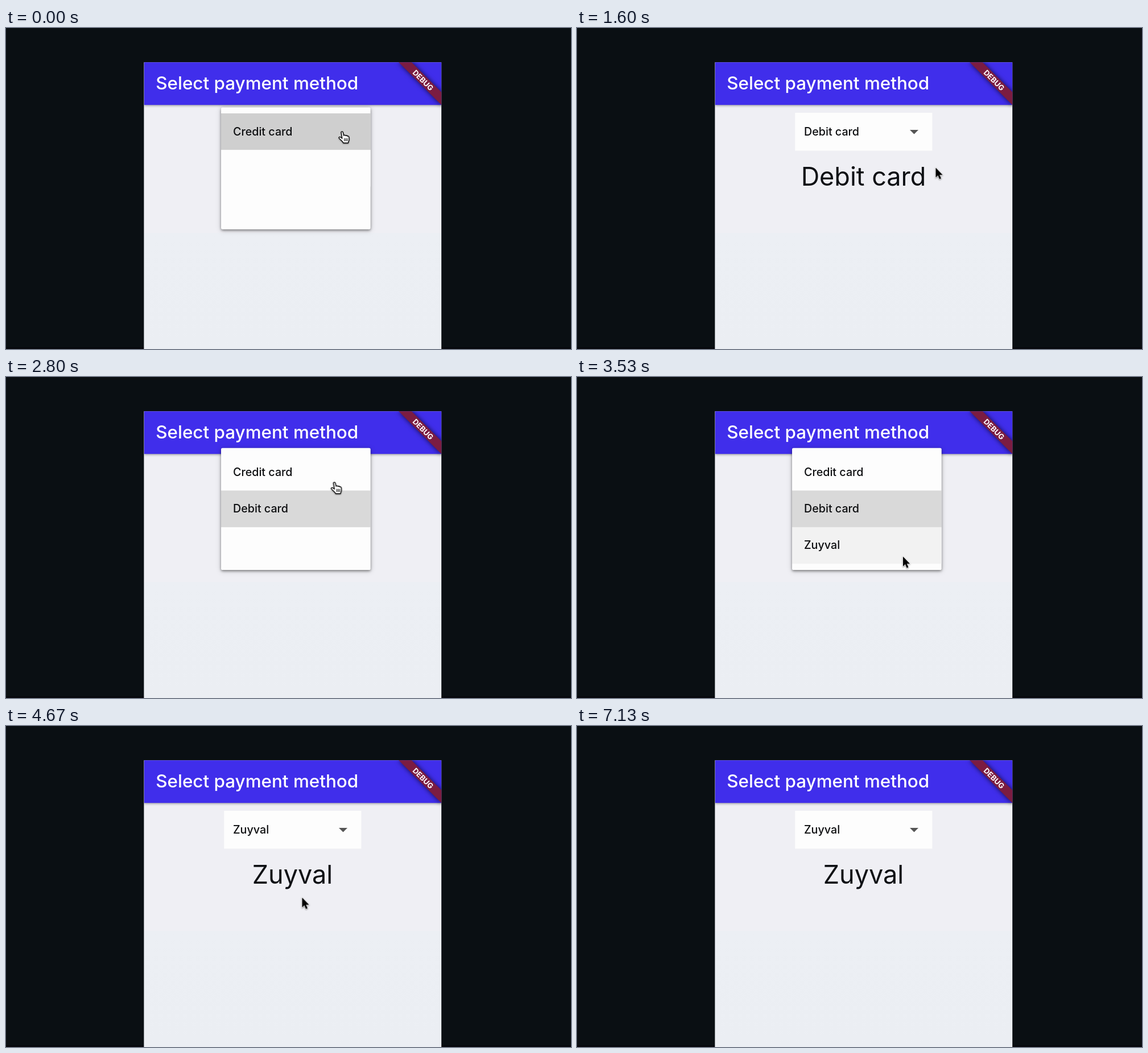
Recreate the animation shown at these times as an HTML page. Size 993 px wide and 564 px high, loop 7.19 s.

```html
<!DOCTYPE html>
<html lang="en">
<head>
<meta charset="utf-8">
<title>Select payment method</title>
<style>
  html, body { margin: 0; width: 100%; height: 100%; overflow: hidden; background: #0a0f13; }
  svg { display: block; width: 993px; height: 564px; font-family: Inter, "Open Sans", sans-serif; }
  .item { font-size: 19.7px; font-weight: 500; fill: #0d0e10; }
  .big { font-size: 45px; fill: #0e1014; text-anchor: middle; }
  .sheet { fill: #fdfdfd; filter: drop-shadow(0 2px 2px #0006) drop-shadow(0 1px 4px #0003); }

  /* Every part shares one clock; poses hold unless a keyframe asks for steps. */
  .anim, .anim * { animation: 7190ms step-end infinite; }

  .credit { animation-name: credit; }
  .debit { animation-name: debit; }
  .third { animation-name: third; }
  @keyframes credit { 0% { opacity: 1 } 17.65%, 100% { opacity: 0 } }
  @keyframes debit { 0% { opacity: 0 } 17.65% { opacity: 1 } 58.4%, 100% { opacity: 0 } }
  @keyframes third { 0% { opacity: 0 } 58.4%, 100% { opacity: 1 } }

  /* First menu: the tail of opening, then a pick of the second row */
  #menuA { animation-name: menuA; }
  #menuA .row1 { animation-name: focusA; }
  #menuA .row2 { animation-name: hoverA; }
  #menuA .label2 { animation-name: labelA2; }
  #menuA .label3 { animation-name: labelA3; }
  @keyframes menuA { 0% { opacity: 1 } 17.65% { opacity: .5 } 18.48%, 100% { opacity: 0 } }
  @keyframes focusA { 0% { fill: #cfcfcf } 12.92%, 100% { fill: #d9d9d9 } }
  @keyframes hoverA { 0% { fill: #fdfdfd } 12.92% { fill: #f2f2f2 } 15.7%, 100% { fill: #e9e9e9 } }
  @keyframes labelA2 { 0% { opacity: 0 } .96%, 100% { opacity: 1 } }
  @keyframes labelA3 { 0% { opacity: 0 } .96% { opacity: .35 } 1.8%, 100% { opacity: 1 } }

  /* Second menu: fades in, unfolds around the middle row, closes on the third */
  #menuB { animation-name: menuB; }
  #menuB .sheet { animation-name: unfold; }
  #menuB .row1 { animation-name: hoverB1; }
  #menuB .row2 { animation-name: focusB; }
  #menuB .row3 { animation-name: hoverB3; }
  #menuB .label1 { animation-name: labelB1; }
  #menuB .label3 { animation-name: labelB3; }
  @keyframes menuB {
    0% { opacity: 0 } 36.15% { opacity: .65 } 37.12% { opacity: 1 }
    58.4% { opacity: .5 } 59.37%, 100% { opacity: 0 }
  }
  @keyframes unfold {
    0% { y: 199.5px; height: 64.5px }
    37.12% { y: 158.6px; height: 146.6px }
    37.95%, 100% { y: 124.8px; height: 214.2px }
  }
  @keyframes focusB { 0% { fill: #f1f1f1 } 37.12%, 100% { fill: #d9d9d9 } }
  @keyframes hoverB1 { 0% { opacity: 0 } 41.7% { opacity: 1 } 48.25%, 100% { opacity: 0 } }
  @keyframes hoverB3 {
    0% { fill: #f2f2f2; opacity: 0 } 48.25% { fill: #f2f2f2; opacity: 1 }
    53.81%, 100% { fill: #e9e9e9; opacity: 1 }
  }
  @keyframes labelB1 { 0% { opacity: 0 } 38.93%, 100% { opacity: 1 } }
  @keyframes labelB3 { 0% { opacity: 0 } 39.9%, 100% { opacity: 1 } }

  #cursor { animation-name: travel; filter: drop-shadow(0 1px 1.2px #0007); }
  #hand { animation-name: hand; }
  #arrow { animation-name: arrow; }
  @keyframes travel {
    0% { transform: translate(589px, 181px) }
    4.58% { transform: translate(589px, 181px); animation-timing-function: steps(7, start) }
    11.07% { transform: translate(588.5px, 245px) }
    22.24% { transform: translate(630.5px, 245px) }
    23.21% { transform: translate(630.5px, 245px); animation-timing-function: steps(8, start) }
    30.59% { transform: translate(575.5px, 184px) }
    47.27% { transform: translate(575px, 222px) }
    48.25% { transform: translate(574px, 276px) }
    49.08% { transform: translate(573px, 315px) }
    50.05% { transform: translate(573px, 334px) }
    51.86% { transform: translate(573px, 316px) }
    64.94% { transform: translate(520.5px, 301px) }
    65.77% { transform: translate(520.5px, 301px); animation-timing-function: steps(7, start) }
    72.28%, 100% { transform: translate(1047px, 350px) }
  }
  @keyframes hand {
    0% { opacity: 1 } 12.92% { opacity: 0 } 26.83% { opacity: 1 } 48.25%, 100% { opacity: 0 }
  }
  @keyframes arrow {
    0% { opacity: 0 } 12.92% { opacity: 1 } 26.83% { opacity: 0 } 48.25%, 100% { opacity: 1 }
  }
</style>
</head>
<body>
<svg viewBox="0 0 993 564">
  <defs>
    <clipPath id="screen"><rect x="242.4" y="60.2" width="522.8" height="504"/></clipPath>
    <linearGradient id="page" x2="0" y2="1">
      <stop offset=".595" stop-color="#efeff4"/>
      <stop offset=".595" stop-color="#eceff4"/>
      <stop offset="1" stop-color="#ebeef3"/>
    </linearGradient>
  </defs>

  <rect width="993" height="564" fill="#0a0f13"/>
  <rect y="561" width="993" height="3" fill="#07080d"/>

  <g clip-path="url(#screen)">
    <rect x="242" y="60" width="524" height="504" fill="url(#page)"/>
    <rect x="242.8" y="60" width="523" height="75.2" fill="#402eeb" style="filter:drop-shadow(0 1px 2px #0006)"/>
    <text x="263.3" y="108" font-size="31.4" font-weight="500" fill="#fff">Select payment method</text>
  </g>

  <rect x="383.3" y="149" width="241" height="66.5" fill="#fdfdfd"/>
  <path d="M585 179h15l-7.5 7.6z" fill="#555"/>
  <g class="anim">
    <g class="credit">
      <text class="item" x="399" y="188.5">Credit card</text>
      <text class="big" x="503.5" y="276.5">Credit card</text>
    </g>
    <g class="debit">
      <text class="item" x="399" y="188.5">Debit card</text>
      <text class="big" x="503.5" y="276.5">Debit card</text>
    </g>
    <g class="third">
      <text class="item" x="399" y="188.5">Zuyval</text>
      <text class="big" x="503.5" y="276.5">Zuyval</text>
    </g>

    <g id="menuA">
      <rect class="sheet" x="378" y="139.5" width="262.7" height="214.2" rx="2.6"/>
      <rect class="row1" x="378" y="150" width="262.7" height="64.3"/>
      <rect class="row2" x="378" y="214.3" width="262.7" height="64.3"/>
      <text class="item" x="399" y="188.5">Credit card</text>
      <text class="item label2" x="399" y="252.8">Debit card</text>
      <text class="item label3" x="399" y="317.1">Zuyval</text>
    </g>

    <g id="menuB">
      <rect class="sheet" x="378" y="124.8" width="262.7" height="214.2" rx="2.6"/>
      <rect class="row1" x="378" y="135.2" width="262.7" height="64.3" fill="#f2f2f2"/>
      <rect class="row2" x="378" y="199.5" width="262.7" height="64.4"/>
      <rect class="row3" x="378" y="263.9" width="262.7" height="64.3"/>
      <text class="item label1" x="399" y="173.8">Credit card</text>
      <text class="item" x="399" y="238.1">Debit card</text>
      <text class="item label3" x="399" y="302.4">Zuyval</text>
    </g>
  </g>

  <g clip-path="url(#screen)">
    <path d="M690 60h22.6l53.4 53.4v22.6z" fill="#7b1c42" style="filter:drop-shadow(0 0 4px #000b)"/>
    <text transform="translate(733 91.8) rotate(45)" y="4.7" font-size="13" font-weight="700" text-anchor="middle" fill="#fff">DEBUG</text>
  </g>

  <g class="anim">
    <g id="cursor">
      <g id="hand" stroke-linejoin="round" stroke-linecap="round">
        <path d="M0 2C.6.3 2.8.6 3.2 2.2L4.7 8C5.4 6.8 7.4 6.8 7.9 8.3 8.8 7.3 10.5 7.7 10.9 9.1 12 8.4 13.7 9.2 13.8 10.7L14 15C13.9 17.5 12.6 18.6 12.4 21H4C3.4 18.6-.5 16-3.6 12.6-4.6 11-2.4 9.6-.8 11L1.8 13z" fill="#fff" stroke="#000" stroke-width="1.4"/>
        <path d="M5.8 13v4.5M8.3 13v4.5M10.8 13v4.5" fill="none" stroke="#000" stroke-width="1.1"/>
      </g>
      <path id="arrow" d="M0 .5V17.7L3.9 14 6.6 20.4 9.5 19.2 6.8 12.9H12z" fill="#000" stroke="#fff" stroke-width="1.3" paint-order="stroke"/>
    </g>
  </g>
</svg>
</body>
</html>
```
